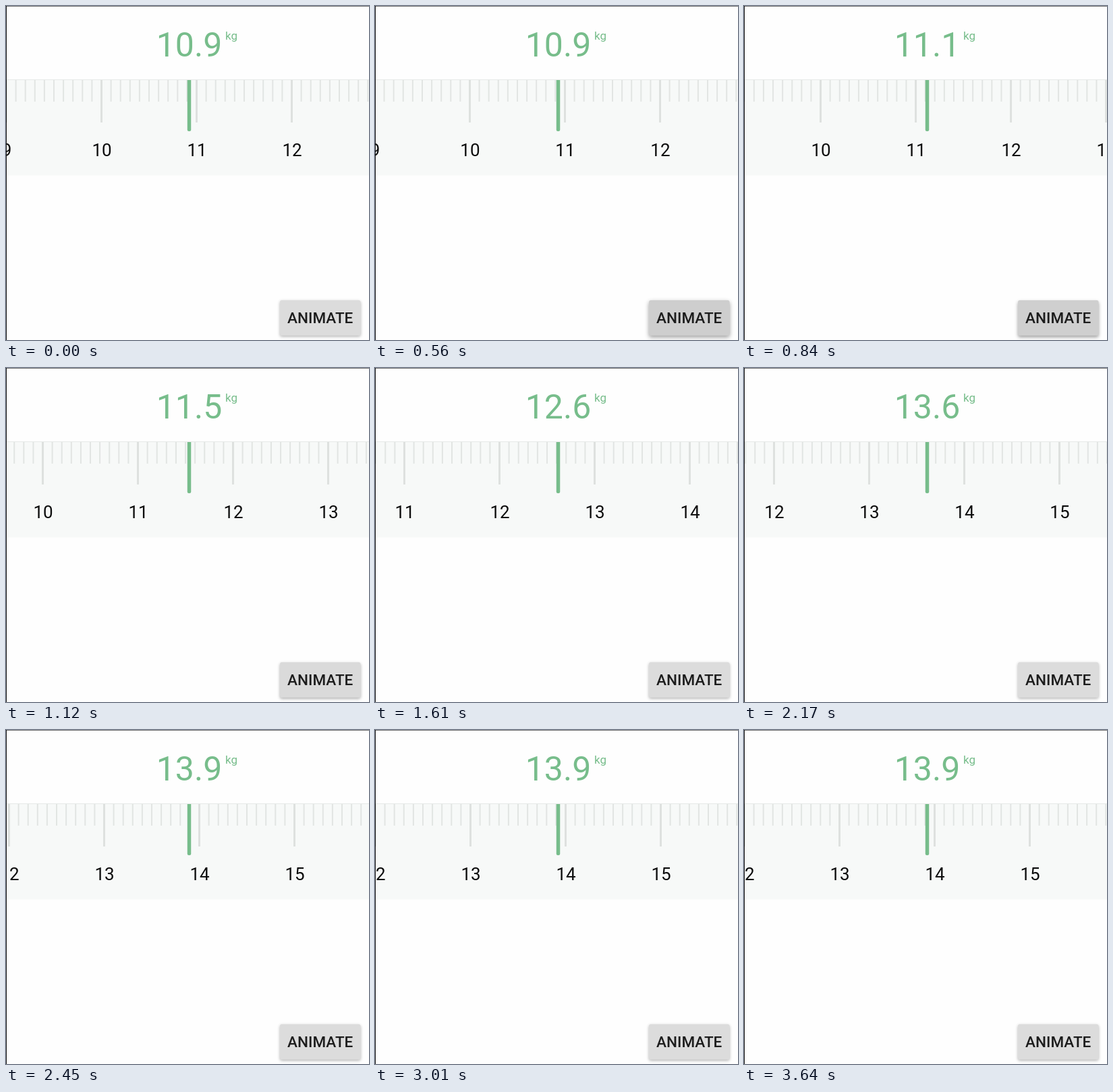
An HTML page with a canvas for the animation above (3710 ms loop, 538 px wide and 496 px high).

```html
<!DOCTYPE html>
<html lang="en">
<head>
<meta charset="utf-8">
<title>Weight ruler</title>
<style>
  html, body { margin: 0; width: 100%; height: 100%; overflow: hidden; background: #fefefe; }
  canvas { display: block; }
</style>
</head>
<body>
<canvas id="stage" width="538" height="496"></canvas>
<script>
const ctx = document.getElementById('stage').getContext('2d');
const LOOP = 3710, STEP = 70;
const NEEDLE_X = 271.5, UNIT = 141;
const START = 10.922, DISTANCE = 3;
const GREEN = '#77bd8b';

// Timing as [ms, value] pairs: progress of the scroll and of the button press.
const SCROLL = [[495, 0], [840, .1655], [1120, .2996], [1610, .5415], [2170, .791], [2450, .938], [2580, 1]];
const PRESS = [[330, 0], [520, 1], [840, .9], [1120, .15], [1260, 0]];

function track(points, t) {
  if (t <= points[0][0]) return points[0][1];
  for (let i = 1; i < points.length; i++) {
    const [t0, v0] = points[i - 1], [t1, v1] = points[i];
    if (t <= t1) return v0 + (v1 - v0) * (t - t0) / (t1 - t0);
  }
  return points[points.length - 1][1];
}

function rect(x, y, w, h, color) {
  ctx.fillStyle = color;
  ctx.fillRect(x, y, w, h);
}

function rounded(x, y, w, h, radii, color) {
  ctx.fillStyle = color;
  ctx.beginPath();
  ctx.roundRect(x, y, w, h, radii);
  ctx.fill();
}

function text(str, x, y, size, color, align = 'center', weight = 400) {
  ctx.font = `${weight} ${size}px Roboto, sans-serif`;
  ctx.textAlign = align;
  ctx.fillStyle = color;
  ctx.fillText(str, x, y);
}

function drawRuler(value) {
  rect(0, 110, 538, 141.5, '#f7f9f8');
  rect(0, 109, 538, 1, '#e6e8e7');
  const first = Math.floor((value - 2.2) * 10), last = Math.ceil((value + 2.2) * 10);
  for (let i = first; i <= last; i++) {
    const x = NEEDLE_X + (i / 10 - value) * UNIT;
    if (i % 10) {
      rect(x - 1, 110, 2, 32, '#e2e5e3');
    } else {
      rect(x - 1.5, 110, 3, 63, '#dee1df');
      text(i / 10, x + .5, 223, 26, '#0c0c0c');
    }
  }
  rounded(NEEDLE_X - 2.75, 110, 5.5, 76, [0, 0, 2.5, 2.5], GREEN);
}

function drawButton(press) {
  const shade = Math.round(220 - 14 * press);
  ctx.save();
  ctx.shadowColor = `rgba(0, 0, 0, ${.3 + .08 * press})`;
  ctx.shadowBlur = 4 + 2 * press;
  ctx.shadowOffsetY = 1.5 + press;
  rounded(406, 437, 119.5, 52.5, 3, `rgb(${shade}, ${shade}, ${shade})`);
  ctx.restore();
  text('ANIMATE', 465.7, 471, 22.5, '#1c1c1c', 'center', 500);
}

function draw(t) {
  const value = START + DISTANCE * (1 - Math.cos(Math.PI * track(SCROLL, t))) / 2;
  rect(0, 0, 538, 496, '#fefefe');
  text(value.toFixed(1), NEEDLE_X, 75, 50, GREEN);
  text('kg', 325, 50, 17, GREEN, 'left');
  drawRuler(value);
  drawButton(track(PRESS, t));
  rect(0, 0, 538, 1, '#777');
  rect(0, 0, 1, 496, '#111');
}

const origin = performance.now();
function tick() {
  const t = (performance.now() - origin) % LOOP;
  draw(Math.floor(t / STEP) * STEP);
  requestAnimationFrame(tick);
}
tick();
</script>
</body>
</html>
```
